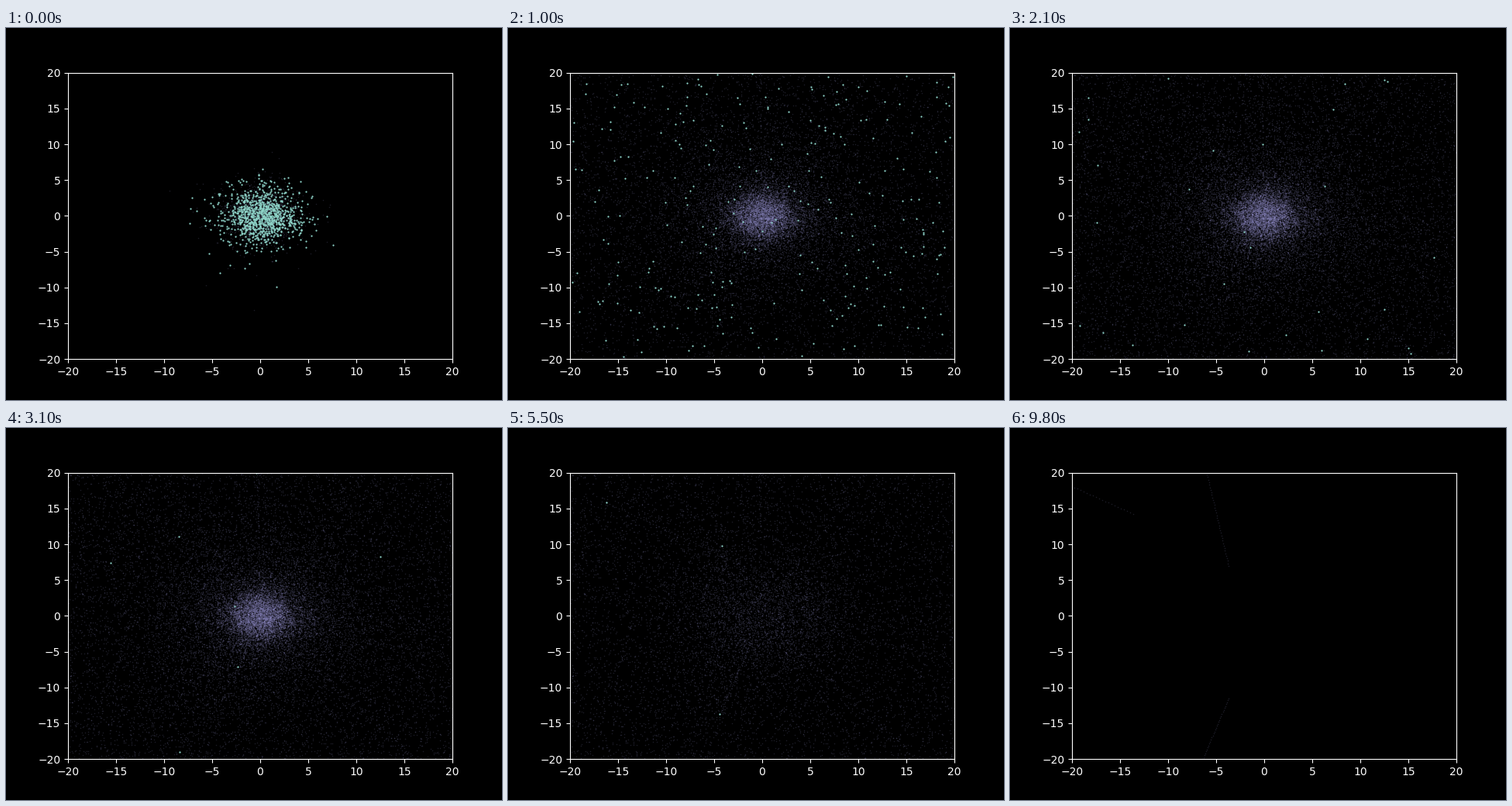
Animation of 640 by 480 pixels, one loop 9.9 s. Source, as a matplotlib script:

```python
import matplotlib.pyplot as plt
import numpy as np
from matplotlib.animation import FuncAnimation

FRAMES = 99
TRAIL = 51        # how many past steps stay visible
LIMIT = 20
BURST = 1000      # particles released at the start
LATE = 560        # particles released afterwards
LAST_BIRTH = 14
CLEAR_TIME = 30   # by now only the slow particles are left
ECHO_STEPS = 4    # steps in which the cluster leaves extra marks
DUST_STEPS = 17   # steps in which faint dust is shed

rng = np.random.default_rng(12)


def cluster(count):
    return rng.standard_t(10, (count, 2)) * 1.9


def outward(start, slowest, spread):
    speed = np.hypot(slowest, rng.rayleigh(spread, len(start)))
    radius = np.hypot(start[:, 0], start[:, 1])
    return start * (speed / radius)[:, None]


def inside(points):
    return points[(np.abs(points) <= LIMIT + 0.2).all(axis=1)]


def make_crowd():
    burst, late = cluster(BURST), rng.normal(0, 6.5, (LATE, 2))
    start = np.vstack([burst, late])
    speed = np.vstack([outward(burst, 1.2, 4.8), outward(late, 1.4, 2.2)])
    birth = np.concatenate([np.zeros(BURST), rng.integers(1, LAST_BIRTH + 1, LATE)])
    end = start + speed * (CLEAR_TIME - birth)[:, None]
    gone = (np.abs(end) > LIMIT).any(axis=1)
    return start[gone], speed[gone], birth[gone]


def make_slow():
    """Stragglers pass through key points at steps 31 and 55 or leave the centre."""
    near = np.array([[-2.7, 1.3], [-8.5, 11.1], [-2.3, -7.1]])
    far = np.array([[-4.2, 9.8], [-16.2, 15.8], [-4.4, -13.7]])
    leaving = np.array([[12.5, 8.3], [-15.6, 7.4], [-8.4, -19], [-0.4, 19.95]])
    speed = np.vstack([(far - near) / 24, leaving / 20])
    birth = np.repeat([13, 11], [len(near), len(leaving)])
    start = np.vstack([near, leaving]) - speed * (31 - birth)[:, None]
    return start, speed, birth


start, speed, birth = map(np.concatenate, zip(make_crowd(), make_slow()))


def heads_at(step):
    born = birth <= step
    age = (step - birth[born])[:, None]
    return inside(start[born] + speed[born] * age)


def marks_at(step):
    marks = [heads[step]]
    if step < ECHO_STEPS:
        marks.append(cluster(3 * BURST // 2))
    if 0 < step < DUST_STEPS:
        marks.append(inside(rng.normal(0, 5, (250, 2))))
        marks.append(rng.uniform(-LIMIT, LIMIT, (200, 2)))
    return np.vstack(marks)


heads = [heads_at(step) for step in range(FRAMES)]
marks = [marks_at(step) for step in range(FRAMES)]

plt.style.use("dark_background")
plt.rcParams["font.family"] = "DejaVu Sans"
fig, ax = plt.subplots(figsize=(6.4, 4.8), dpi=100)
ax.set_xlim(-LIMIT, LIMIT)
ax.set_ylim(-LIMIT, LIMIT)
trail, = ax.plot([], [], "o", color="#a09cdc", ms=1.1, mew=0, alpha=0.18)
dots, = ax.plot([], [], "o", color="#8dd3c7", ms=1.6, mew=0)


def draw(step):
    past = np.vstack(marks[max(0, step - TRAIL):step + 1])
    trail.set_data(past[:, 0], past[:, 1])
    dots.set_data(heads[step][:, 0], heads[step][:, 1])
    return trail, dots


anim = FuncAnimation(fig, draw, frames=FRAMES, interval=100, repeat=True)
plt.show()
```
